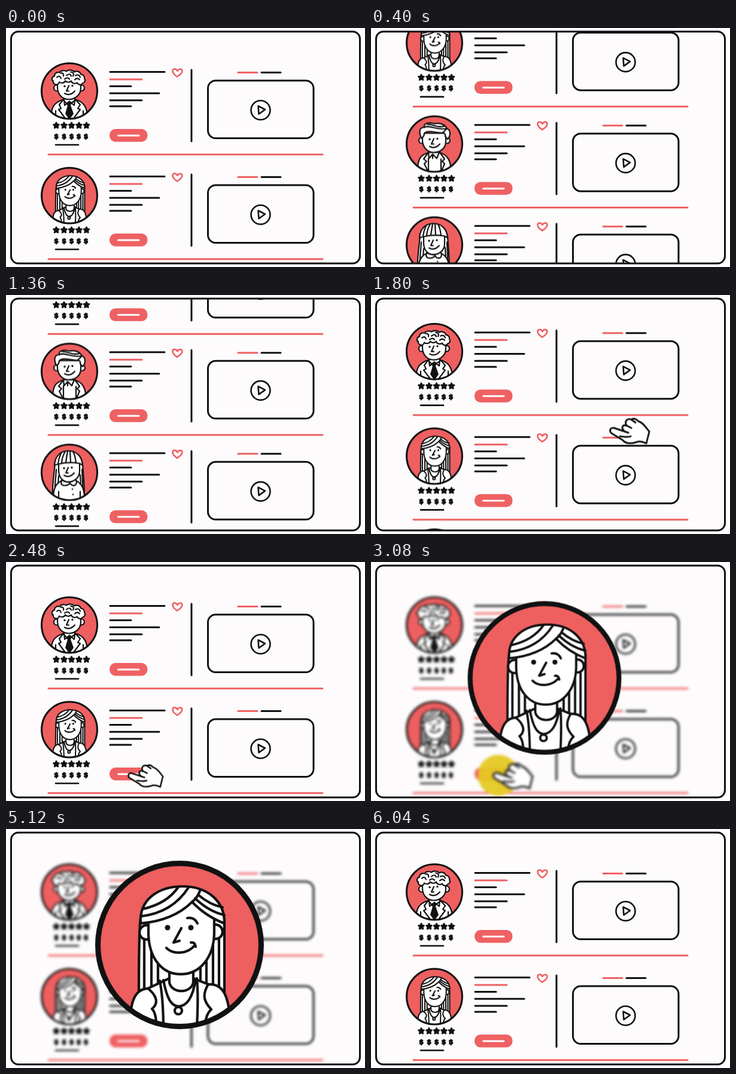
Recreate the animation shown at these times as an HTML page without scripts. Size 600 by 400 pixels, loop 6120 ms.

```html
<!DOCTYPE html>
<html lang="en">
<head>
<meta charset="utf-8">
<title>Browsing profiles</title>
<style>
html, body { margin: 0; width: 100%; height: 100%; overflow: hidden; background: #fff; }
svg { display: block; width: 100%; height: 100%; }
.ink { fill: none; stroke: #111; stroke-linecap: round; stroke-linejoin: round; }
.w { fill: #fff; }
.red { stroke: #ef6163; }
.disc { fill: #ee5f60; stroke: none; }
.dot { fill: #111; stroke: none; }
.cash { font: bold 11px "DejaVu Sans", sans-serif; text-anchor: middle; fill: #111; stroke: #111; stroke-width: 1.2; }

.scene, .list, .hand, .press, .pulse, .popup {
  animation: 6120ms cubic-bezier(.65, 0, .35, 1) infinite;
}
.list { animation-name: scroll; }
.scene { animation-name: blur; }
.hand { animation-name: travel; }
.press { animation-name: press; }
.pulse { animation-name: pulse; transform-origin: 213px 357px; }
.popup { animation-name: popup; transform-origin: 290px 194px; }

@keyframes scroll {
  0%, .16% { transform: translateY(0); }
  11.11% { transform: translateY(-357px); }
  17.52% { transform: translateY(-357px); animation-timing-function: cubic-bezier(.76, 0, .24, 1); }
  32.39%, 100% { transform: translateY(0); }
}
@keyframes blur {
  0%, 39.9% { filter: blur(0); }
  49.7%, 83.4% { filter: blur(2px); }
  98.7%, 100% { filter: blur(0); }
}
@keyframes travel {
  0%, 22.1% { transform: translate(625px, 76px); }
  36.4%, 50.4% { transform: translate(205px, 357px); }
  58.8%, 100% { transform: translate(260px, 430px); }
}
@keyframes press {
  0%, 38.5% { transform: scale(1); }
  40.5% { transform: scale(.88); }
  43%, 100% { transform: scale(1); }
}
@keyframes pulse {
  0%, 39.2% { transform: scale(0); opacity: .93; }
  45.75%, 59.5% { transform: scale(1); opacity: .93; }
  64%, 100% { transform: scale(1); opacity: 0; }
}
@keyframes popup {
  0%, 40.85% { transform: scale(0); }
  53.92%, 83.4% { transform: scale(1); }
  96.4%, 100% { transform: scale(0); }
}
</style>
</head>
<body>
<svg viewBox="0 0 600 400">
<defs>
  <clipPath id="panel"><rect x="8.5" y="6" width="583" height="388" rx="12"/></clipPath>
  <clipPath id="small"><circle r="46"/></clipPath>
  <clipPath id="large"><circle cx="290" cy="194" r="136"/></clipPath>

  <path id="star" d="M0-4.6 1.4-1.7 4.6-1.3 2.2 1 2.9 4.3 0 2.7-2.9 4.3-2.2 1-4.6-1.3-1.4-1.7Z"/>

  <g id="card" class="ink" stroke-width="3">
    <g fill="#111" stroke-width="2.5">
      <use href="#star" x="84" y="163"/><use href="#star" x="97" y="163"/><use href="#star" x="109.5" y="163"/><use href="#star" x="122" y="163"/><use href="#star" x="134.5" y="163"/>
    </g>
    <g class="cash">
      <text x="84" y="184.5">$</text><text x="97" y="184.5">$</text><text x="109.5" y="184.5">$</text><text x="121.5" y="184.5">$</text><text x="133.5" y="184.5">$</text>
    </g>
    <path stroke-width="2.6" d="M83 195.5H121"/>
    <path d="M174 73.5H265M174 97.5H209M174 109.3H256M174 121H227M174 131H209M310 70V189.5M427 74.5H459"/>
    <path class="red" d="M174 86H227M388 74.5H420M71 211.8H529"/>
    <path class="red" stroke-width="2.6" d="M286 81.5C281 78 278 75 278.5 71.5C279 67.5 284.5 67.5 286.5 72C288.5 67.5 294 68 294.5 71.5C294.5 75.5 291 78.5 286 81.5Z"/>
    <rect x="173" y="169" width="63.5" height="21.5" rx="10" fill="#ef6163" stroke="none"/>
    <path stroke="#fff" d="M187.5 180H222"/>
    <rect x="337.5" y="88" width="176.5" height="96.5" rx="13"/>
    <g stroke-width="2.6"><circle cx="425.5" cy="137.5" r="16"/><path d="M421.5 130.5 433 136.5 422.5 144Z"/></g>
  </g>

  <circle id="ring" r="46.5" stroke-width="3"/>

  <g id="face">
    <circle class="dot" cx="-8" cy="-8" r="1.7"/><circle class="dot" cx="5" cy="-9" r="1.7"/>
    <path d="M-1-9-5 0H-1M-8 4Q1 9 9 0"/>
  </g>

  <g id="curly" class="ink" stroke-width="2.2">
    <circle class="disc" r="46"/>
    <g clip-path="url(#small)">
      <path class="w" d="M-31 50C-31 26-26 19-9 14H9C25 18 30 27 31 50Z"/>
      <path class="w" d="M-9 10V16L-2 24 9 16V10"/>
      <path class="dot" d="M-4 19 0 16 4 19 2 24 7 38 0 48-7 38-3 24Z"/>
      <path d="M-10 14-17 23-14 29-18 31-6 47M10 14 18 23 14 29 18 31 6 47M-9 15-8 24-3 20M9 15 8 24 3 20M-23 33V48M23 33V48"/>
      <circle class="w" cx="-21" cy="-5" r="5"/><circle class="w" cx="20" cy="-5" r="5"/>
      <path class="w" d="M-20-18V-5C-19 8-10 14-1 14C10 14 19 6 19-5V-18Z"/>
      <use href="#face"/>
      <path class="w" d="M-27-16a5 5 0 0 1 2-9a6 6 0 0 1 8-6a8 6 0 0 1 12-2a8 6 0 0 1 13 1a7 6 0 0 1 11 4a6 6 0 0 1 6 7a5 5 0 0 1-3 8a5 5 0 0 1-9-1a6 5 0 0 1-10-3a6 5 0 0 1-10 0a6 5 0 0 1-10 2a5 5 0 0 1-10-2Z"/>
      <path d="M-21-23q5-4 7 2M-15-30q6-1 5 5M-5-26q6-5 8 1M2-32q7 1 4 7M10-26q6-3 8 3M-8-20q5-4 8 0M9-19q4-4 8 0"/>
    </g>
    <use href="#ring"/>
  </g>

  <g id="swept" class="ink" stroke-width="2.2">
    <circle class="disc" r="46"/>
    <g clip-path="url(#small)">
      <path class="w" d="M-28 50C-29 24-23 18-9 14H8C22 18 28 27 28 50Z"/>
      <path d="M-10 14-18 25-13 29-17 33-10 47M9 14 17 25 13 29 17 33 11 47M-10 14-9 24-3 17 4 24 8 14M-3 18V24M-10 24V47M11 25V47"/>
      <circle class="w" cx="-21" cy="-6" r="5"/><circle class="w" cx="21" cy="-6" r="5"/>
      <path class="w" d="M-20-18V-4C-18 9-9 14-1 14C10 14 19 7 19-4V-18Z"/>
      <use href="#face"/>
      <path class="w" d="M-22-10C-27-22-24-28-17-28C-19-35-8-37 0-34C9-36 17-33 21-26C27-24 28-14 22-8L18-13Q19-18 14-19C4-17-9-25-17-18Q-17-12-22-10Z"/>
      <path d="M-17-28C-7-33 4-22 21-26M-12-33C-2-34 4-26 17-30M21-26Q17-22 14-19"/>
    </g>
    <use href="#ring"/>
  </g>

  <g id="fringe" class="ink" stroke-width="2.2">
    <circle class="disc" r="46"/>
    <g clip-path="url(#small)">
      <path class="w" d="M-24-15C-26 5-29 24-28 39H25C25 20 23 0 22-15Z"/>
      <path d="M-22-5C-23 12-25 24-24 38M-18 6-20 34M18 4 20 36M21-5 23 38"/>
      <path class="w" d="M-27 50C-28 27-23 18-11 13H9C22 18 26 30 25 50Z"/>
      <path d="M-18 32V48M18 32V48"/>
      <path class="w" d="M-18-18V-2C-17 10-10 16-2 16C8 16 17 9 17-2V-18Z"/>
      <use href="#face" x="-1" y="1"/>
      <path class="w" d="M-13 13Q-16 22-8 22Q-2 22 1 18Q5 24 10 21Q14 17 10 12Q0 20-13 13Z"/>
      <circle class="dot" cx="5" cy="28" r="1.3"/><circle class="dot" cx="6" cy="37" r="1.3"/>
      <path class="w" d="M-25-12C-24-28-14-36-2-36C12-36 21-27 22-12L17-15Q-1-18-18-14Z"/>
      <path d="M-7-35Q-12-27-13-16M-3-36-6-17M1-36 2-17M6-35Q10-27 11-16M-14-32Q-18-24-19-15"/>
    </g>
    <use href="#ring"/>
  </g>

  <g id="parted" class="ink">
    <circle class="disc" cx="290" cy="194" r="136"/>
    <g clip-path="url(#large)">
      <path class="w" d="M225 150Q222 165 222 280H365V150Z"/>
      <path d="M231 185V275M243 200V275M254 220V270M325 225V260M335 215V265M346 195V270M356 180V272"/>
      <path class="w" d="M206 340C207 295 212 268 237 267L273 250H313L338 260C364 258 374 280 376 340Z"/>
      <path class="w" d="M273 230V257C277 276 309 276 313 257V230Z"/>
      <path d="M257 254C262 280 263 305 263 335M319 250C322 280 320 305 319 335M237 267C248 275 258 290 244 301Q252 309 251 335M338 260C326 280 333 291 343 302Q331 313 334 335M263 253C269 284 276 296 288 297C303 296 312 282 317 252"/>
      <circle class="w" cx="288" cy="304" r="6"/>
      <circle class="w" cx="235" cy="173" r="12"/><circle class="w" cx="350" cy="172" r="12"/>
      <path class="w" d="M238 145V175C239 218 262 243 292 243C325 243 347 214 348 175V140L310 118Z"/>
      <circle class="dot" cx="270" cy="165" r="4.5"/><circle class="dot" cx="309" cy="165" r="4.5"/>
      <path d="M293 166 280 190 290 187M268 199C280 211 304 209 315 195M309 190Q316 189 317 197M303 149Q315 147 320 158"/>
      <path class="w" d="M225 158C222 118 255 96 295 96C337 96 366 121 365 158Q334 146 311 122Q280 153 225 158Z"/>
      <path d="M311 122Q319 116 324 104M226 146Q278 140 305 98M228 134Q269 125 288 97M316 116Q339 138 365 144M321 110Q341 127 362 131"/>
    </g>
    <circle cx="290" cy="194" r="136.5" stroke-width="9"/>
  </g>
</defs>

<rect x="8.5" y="6" width="583" height="388" rx="12" fill="#fdfbfc"/>
<g clip-path="url(#panel)">
  <g class="scene">
    <g class="list">
      <use href="#card"/>
      <use href="#card" y="175"/>
      <use href="#card" y="344"/>
      <use href="#card" y="513"/>
      <use href="#curly" x="106" y="105.5"/>
      <use href="#parted" transform="translate(106 280.5) scale(.34) translate(-290 -194)" stroke-width="6"/>
      <use href="#swept" x="106" y="449.5"/>
      <use href="#fringe" x="106" y="618.5"/>
    </g>
    <circle class="pulse" cx="213" cy="357" r="34.5" fill="#e5c920"/>
    <g class="hand"><g class="press ink" stroke-width="2.9">
      <path class="w" d="M2 5C-3 1 0-5 6-4L24 2C17-4 20-10 27-8C23-15 28-21 35-18C39-21 44-18 47-15C55-13 59-5 65 2L60 22C52 18 47 18 43 20C33 23 25 22 20 16Z"/>
      <path d="M27-8 35-4M24 2 30 4M35-18 42-13M16 10C24 11 29 12 34 10"/>
    </g></g>
  </g>
  <g class="popup"><use href="#parted" stroke-width="4.2"/></g>
</g>
<rect class="ink" x="8.5" y="6" width="583" height="388" rx="12" stroke-width="3"/>
</svg>
</body>
</html>
```
